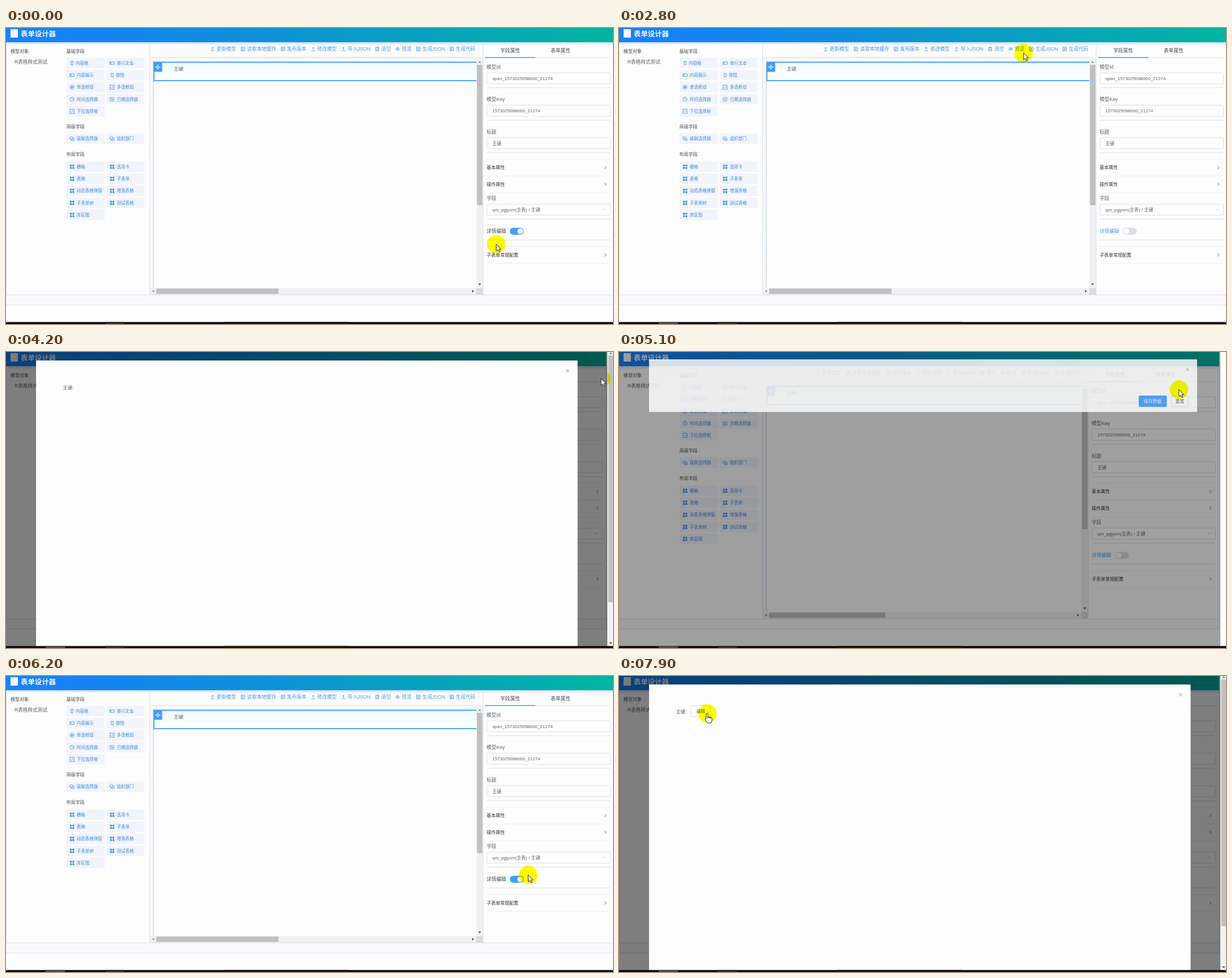
Animation of 1071x523 px, one loop 8 s. Source, as an HTML page:

```html
<!DOCTYPE html>
<html lang="zh-CN">
<head>
<meta charset="utf-8">
<title>表单设计器</title>
<style>
html, body { margin: 0; width: 100%; height: 100%; overflow: hidden; background: #fdfdfd; }
svg { display: block; width: 1071px; height: 523px; }
text { font-family: "Liberation Sans", "Noto Sans CJK SC", "Noto Sans CJK", sans-serif; white-space: pre; }
.icon { fill: none; stroke: #4a97ea; stroke-width: .9; }
.solid { fill: #3a8ee6; stroke: none; }
.glow { mix-blend-mode: multiply; }
</style>
</head>
<body>
<svg viewBox="0 0 1071 523">
  <defs>
    <linearGradient id="brand">
      <stop offset="0" stop-color="#1880fc"/>
      <stop offset=".2" stop-color="#1384ee"/>
      <stop offset="1" stop-color="#00b5a0"/>
    </linearGradient>
    <linearGradient id="shade" x2="0" y2="1">
      <stop offset="0" stop-color="#c6dcf8"/>
      <stop offset="1" stop-color="#fdfdfd"/>
    </linearGradient>
    <linearGradient id="picked" x2="0" y2="1">
      <stop offset="0" stop-color="#f1fafd"/>
      <stop offset="1" stop-color="#fcfeff"/>
    </linearGradient>
  </defs>
  <g id="page"></g>
  <g id="right"></g>
  <g id="top"></g>
  <g id="edge"></g>
  <rect id="mask" width="1061" height="520"/>
  <g id="pageBar"></g>
  <g id="dialog"></g>
  <g id="closing"></g>
  <g id="taskbar"></g>
  <circle id="glow" class="glow" r="16.3" fill="#ffff00"/>
  <path id="arrow" d="M0 0V12.2L2.9 9.6 4.9 13.8 6.9 12.9 5 8.8H8.6Z" fill="#fff" stroke="#111" stroke-width=".9"/>
  <path id="hand" d="M-2 9V1.2a1.4 1.4 0 0 1 2.8 0V6L6 7.1q2.5.5 2.3 2.8L7.6 13.5 6.5 17H0L-4 11q-.8-2.4 2-2ZM.8 6V9M3.4 6.6V9M5.8 7V9.4" fill="#fff" stroke="#111" stroke-width=".9"/>
</svg>
<script>
const $ = id => document.getElementById(id);
const BLUE = '#409eff', DARK = '#484b50', GREY = '#606266', LINE = '#dcdfe8';

const add = (parent, markup) => parent.insertAdjacentHTML('beforeend', markup);
const rect = (x, y, w, h, fill, extra = '') =>
  `<rect x="${x}" y="${y}" width="${w}" height="${h}" fill="${fill}" ${extra}/>`;
const path = (d, extra) => `<path d="${d}" ${extra}/>`;
const rule = (x1, y, x2, color = LINE, extra = '') =>
  path(`M${x1} ${y}H${x2}`, `stroke="${color}" ${extra}`);
const column = (x, y1, y2, color = LINE, extra = '') =>
  path(`M${x} ${y1}V${y2}`, `stroke="${color}" ${extra}`);
// y is the vertical middle of the glyphs
const label = (x, y, s, size, fill, extra = '') =>
  `<text x="${x}" y="${y + size * .37}" font-size="${size}" fill="${fill}" ${extra}>${s}</text>`;
const middle = 'text-anchor="middle"';
const outline = color => `stroke="${color}" rx="2"`;

const icons = {
  phone: '<path d="M-1.8-3H1.8V3H-1.8Z"/>',
  wide: '<path d="M-4-2.2H4V2.2H-4ZM-2-2.2V2.2"/>',
  radio: '<circle r="3.7"/><circle r="1.7" class="solid"/>',
  check: '<path d="M-3.7-3.7H3.7V3.7H-3.7ZM-2 0-.5 1.6 2.3-1.6"/>',
  clock: '<circle r="3.7"/><path d="M0-2.2V.3H2"/>',
  date: '<path d="M-3.6-3H3.6V3.6H-3.6ZM-3.6-1H3.6M-2 .7H2M-2 2.2H2" opacity=".7"/>',
  select: '<path d="M-3.7-3.7H3.7V3.7H-3.7ZM-2-.9 0 1.1 2-.9"/>',
  cascade: '<path d="M-3.6-3H1.2V.8H-3.6ZM-.6.8V3H3.6V-.8H1.2"/>',
  grid: '<path class="solid" d="M-3.6-3.6h3.1v3.1h-3.1ZM.7-3.6h3.1v3.1H.7ZM-3.6.7h3.1v3.1h-3.1ZM.7.7h3.1v3.1H.7Z"/>',
  up: '<path d="M-3.3 3.2H3.3M0 1.6V-3M-2-1 0-3 2-1"/>',
  doc: '<path d="M-3-3.4H3V3.4H-3ZM-1.5-1.3H1.5M-1.5.3H1.5M-1.5 1.8H.5"/>',
  trash: '<path d="M-3.6-2.2H3.6M-1.2-2.2V-3.4H1.2V-2.2M-2.7-2.2V3.4H2.7V-2.2M-.9-.3V1.8M.9-.3V1.8"/>',
  eye: '<path d="M-3.8 0Q0-5 3.8 0Q0 5-3.8 0Z"/><circle r="1.2"/>'
};
const icon = (x, y, kind) => `<g class="icon" transform="translate(${x} ${y})">${icons[kind]}</g>`;
const triangle = (x, y, turn, color = '#444') =>
  path('M-2.6 1.4H2.6L0-1.6Z', `fill="${color}" transform="translate(${x} ${y}) rotate(${turn})"`);
const chevron = (x, y, turn = 0, color = '#7d8087') =>
  path('M-1.5-2.8 1.5 0-1.5 2.8', `fill="none" stroke="${color}" transform="translate(${x} ${y}) rotate(${turn})"`);
const cross = (x, y) =>
  path(`M${x - 2.8} ${y - 2.8}l5.6 5.6m0-5.6l-5.6 5.6`, 'stroke="#909399" stroke-width=".9"');

function palette(y, title, kinds, names) {
  add($('page'), label(106.5, title, y, 8, DARK));
  names.forEach((name, i) => {
    const cx = i % 2 * 70.7, cy = kinds.y + (i >> 1) * 21.3;
    const kind = kinds.list[i] || kinds.list[0];
    const indent = kind === 'phone' ? 123 : 124.7;
    add($('page'), rect(107 + cx, cy - 9.2, 67, 18.4, '#f2f4fb') +
      icon(116.5 + cx, cy, kind) + label(indent + cx, cy, name, 7.5, '#4088dc'));
  });
}

function buildPage() {
  const page = $('page');
  add(page, rect(0, 0, 1071, 523, '#fdfdfd') +
    label(8, 41, '模型对象', 8, DARK) + label(15, 59.5, 'R表格样式测试', 8.6, GREY));
  palette('基础字段', 41, { y: 62, list: ['phone', 'wide', 'wide', 'phone', 'radio', 'check', 'clock', 'date', 'select'] },
    ['内容框', '单行文本', '内容展示', '按钮', '单选框组', '多选框组', '时间选择器', '日期选择器', '下拉选择框']);
  palette('高级字段', 174, { y: 195.7, list: ['cascade', 'cascade'] }, ['级联选择器', '组织部门']);
  palette('布局字段', 223.5, { y: 245, list: ['grid'] },
    ['栅格', '选项卡', '表格', '子表单', '动态表格弹窗', '增强表格', '子表单树', '测试表格', '库区图']);
  add(page, column(.5, 28, 490) + column(253.5, 28, 471) +
    rect(254, 53, 6, 418, '#f7f8fb') + rect(254, 53, 577, 6, '#f9fafc') +
    rule(254, 52.5, 842) +
    rect(261, 60.5, 590, 32.5, 'url(#picked)', `stroke="${BLUE}" stroke-width="1.8"`) +
    column(260, 59, 459, '#8fa3b8', 'stroke-dasharray="2 1.5"') +
    rule(260, 59.5, 830, '#9ab2cc', 'stroke-dasharray="2 1.5"') +
    rect(260.5, 60, 15, 17.5, BLUE) +
    path('M264 69H272M268 65V73M266.7 66.3 268 65 269.3 66.3M266.7 71.7 268 73 269.3 71.7M265.3 67.7 264 69 265.3 70.3M270.7 67.7 272 69 270.7 70.3',
      'fill="none" stroke="#fff"') +
    label(296, 72, '主键:', 8.3, GREY) +
    rect(254, 459.5, 580, 11.5, '#f0f0f2') + triangle(259.5, 465, -90, '#888') +
    rect(265, 460.3, 216, 9.6, '#c1c1c1', 'id="thumb"') +
    rect(0, 471, 1071, 18.5, '#f9f9fc') + rule(0, 471.5, 1071) + rule(0, 489.5, 1071));
}

function buildRight() {
  const right = $('right');
  const tools = [[364.5, 'up', '更新模型'], [418, 'doc', '读取本地缓存'], [488.5, 'doc', '发布版本'],
    [542, 'up', '修改模型'], [595.5, 'up', '导入JSON'], [655, 'trash', '清空'], [691, 'eye', '预览'],
    [727.5, 'doc', '生成JSON'], [786.5, 'doc', '生成代码']];
  tools.forEach(([x, kind, name]) => add(right, icon(x, 37, kind) + label(x + 7.3, 37, name, 8.6, '#4a97e8')));

  add(right, rect(842, 28, 245, 443, '#fdfdfd') + rect(830, 54, 11.5, 405.5, '#f0f0f2') +
    rect(831, 65, 9.6, 248, '#c1c1c1') + triangle(835.7, 60, 0, '#888') + triangle(835.7, 453, 180) +
    triangle(824, 465, 90) + rect(830, 459.5, 11.5, 11.5, '#dcdcdc') + column(841.8, 28, 471) +
    label(889.5, 39.3, '字段属性', 8.7, DARK, middle) + label(978.5, 39.3, '表单属性', 8.7, DARK, middle) +
    rule(845, 52.5, 1066) + rule(845, 52.2, 934, BLUE, 'stroke-width="1.4"'));

  const field = (y, name, value) => label(848, y, name, 8.6, GREY) +
    rect(848.5, y + 10.2, 218, 19.5, '#fefefe', outline('#dddfe5')) + label(858, y + 20, value, 8, GREY);
  add(right, field(69, '模型Id', 'span_1573025098000_21274') + field(126.2, '模型Key', '1573025098000_21274') +
    field(183.6, '标题', '主键') + field(301, '字段', 'qm_ygjyxm(主表) / 主键') + chevron(1055.5, 320.5, 90, '#c0c4cc'));
  [105.5, 163, 220.5, 337.5, 374.5].forEach(y => add(right, rule(848, y, 1066)));
  [231.5, 261.5, 291.5, 386.5, 416].forEach(y => add(right, rule(848, y, 1066, '#ebeef2')));
  [[246.5, '基本属性'], [276, '操作属性'], [401, '子表单常规配置']].forEach(([y, name]) =>
    add(right, label(848, y, name, 8, '#303133', 'font-weight="500"') + chevron(1057.5, y)));
  add(right, label(848, 359, '详情编辑', 8.6, DARK, 'id="switchLabel"') +
    rect(889, 353, 24.5, 12.3, BLUE, 'rx="6.15" id="track"') +
    '<circle id="knob" cy="359.15" r="5" fill="#fff"/>');
}

function buildOverlays() {
  add($('top'), rect(0, 25, 1071, 6, 'url(#shade)') + rect(0, 0, 1071, 25, 'url(#brand)', 'id="banner"') +
    rect(8, 2, 13, 15, '#f4f8ff') + label(26, 10, '表单设计器', 12.4, '#f4f8ff', 'font-weight="700"'));
  add($('edge'), rect(1059, 0, 12, 520, '#fdfdfd') + column(1058.8, 26, 490));
  add($('pageBar'), rect(1061.5, 0, 9.5, 520, '#f1f1f1') + rect(1062.5, 6, 8.5, 436, '#c1c1c1') +
    triangle(1067, 2, 0, '#777') + triangle(1067, 514.5, 180));
  add($('dialog'), rect(53, 15, 955.5, 506, '#fdfdfd', 'rx="1"') + cross(991, 33) +
    label(100.5, 62.5, '主键:', 8.3, GREY) +
    `<g id="edit">${rect(127, 52.5, 34.5, 19.5, '#fdfdfd', outline(LINE))}${label(144.3, 62.3, '编辑', 7.6, GREY, middle)}</g>`);
  add($('closing'), rect(53, 15, 967, 93, '#fdfdfd', 'rx="1"') + cross(1003, 33) +
    rect(917, 79, 49.5, 20, BLUE, 'rx="2"') + label(941.7, 89, '保存数据', 7.8, '#fff', middle) +
    rect(974.5, 79.5, 30, 19, '#fdfdfd', outline(LINE)) + label(989.5, 89, '重置', 7.8, GREY, middle));
  add($('taskbar'), rect(0, 519.5, 1071, 4, '#0b0a0c') + rect(175, 519.5, 33, 4, '#2a2a2d') +
    rect(70, 519.5, 34, 4, '#4c4c50', 'id="task"') + rect(385, 519.5, 220, 4, '#1c120a'));
}

const LOOP = 8000;
const OPEN_1 = 3150, CLOSE = 5050, UNLOCK = 5450, OPEN_2 = 7400;
const SWITCH_OFF = 1650, SWITCH_ON = 5850;
const route = [[0, 865, 382], [1000, 865, 382], [1450, 907, 362], [2050, 907, 362], [2700, 740, 62],
  [2850, 705, 38], [2960, 705, 38], [3300, 356.5, 129.5], [3650, 100, 75], [3850, 130, 66], [4200, 1050, 47],
  [4500, 992, 34], [5050, 991, 33], [5300, 963, 343], [5650, 905, 359], [6050, 905, 359], [6400, 946, 340],
  [6850, 705, 35], [6960, 705, 35], [7200, 277, 114], [7300, 289, 116], [7400, 285, 115], [7800, 156, 66], [8000, 156, 66]];
const handTimes = [[1450, 2150], [2820, 2990], [4450, 5080], [5600, 6120], [6800, 6980], [7720, 8000]];

const clamp = v => Math.min(1, Math.max(0, v));
const ramp = (t, start, length) => clamp((t - start) / length);
const smooth = u => u * u * (3 - 2 * u);
const show = (el, on) => el.style.display = on ? '' : 'none';
const move = (el, x, y) => el.setAttribute('transform', `translate(${x} ${y})`);

function pointer(t) {
  const i = route.findIndex(([time]) => time > t);
  const [t0, x0, y0] = route[i - 1], [t1, x1, y1] = route[i];
  const u = smooth((t - t0) / (t1 - t0));
  return [x0 + (x1 - x0) * u, y0 + (y1 - y0) * u];
}

function draw(t) {
  const locked = t >= OPEN_1 && t < UNLOCK || t >= OPEN_2;
  const open = t >= OPEN_1 && t < CLOSE || t >= OPEN_2;
  const start = t >= OPEN_2 ? OPEN_2 : OPEN_1;
  move($('right'), locked ? -14 : 0, 0);
  show($('edge'), locked);
  $('banner').setAttribute('width', locked ? 1059 : 1071);
  $('thumb').setAttribute('width', locked ? 205 : 216);

  const on = 1 - smooth(ramp(t, SWITCH_OFF, 300)) + smooth(ramp(t, SWITCH_ON, 300));
  $('knob').setAttribute('cx', 895.2 + 12.2 * on);
  const mix = (a, b) => Math.round(a + (b - a) * on);
  $('track').setAttribute('fill', `rgb(${mix(220, 64)},${mix(223, 158)},${mix(230, 255)})`);
  $('switchLabel').setAttribute('fill', on > .4 ? DARK : '#4a9be8');

  const u = ramp(t, start, 300), eased = 1 - (1 - u) ** 2;
  show($('dialog'), open);
  show($('pageBar'), open);
  show($('edit'), t >= OPEN_2);
  move($('dialog'), 0, -20 * (1 - eased));
  $('dialog').setAttribute('opacity', eased ** 1.8);

  const out = ramp(t, CLOSE, 300);
  show($('closing'), t >= CLOSE && out < 1);
  move($('closing'), 0, -12 * out);
  $('closing').setAttribute('opacity', 1 - out);
  $('mask').setAttribute('opacity', .5 * (open ? ramp(t, start, 180) : t >= CLOSE ? 1 - ramp(t, CLOSE, 200) : 0));
  show($('task'), t >= 1000 && t < 6400 || t >= OPEN_2);

  const [x, y] = pointer(t);
  const hand = handTimes.some(([a, b]) => t >= a && t < b);
  ['glow', 'arrow', 'hand'].forEach(id => move($(id), x, y));
  show($('arrow'), !hand);
  show($('hand'), hand);
  // beyond the dialog the glow only shows on the page scrollbar
  $('glow').style.clipPath = open && x > 1025 ? `inset(0 0 0 ${1061 - x + 16.3}px)` : '';
}

function frame(now) {
  draw(now % LOOP);
  requestAnimationFrame(frame);
}

// palette takes its title before the vertical position
palette = (build => (title, y, kinds, names) => build(title, y, kinds, names))(palette);
buildPage();
buildRight();
buildOverlays();
draw(0);
requestAnimationFrame(frame);
</script>
</body>
</html>
```
